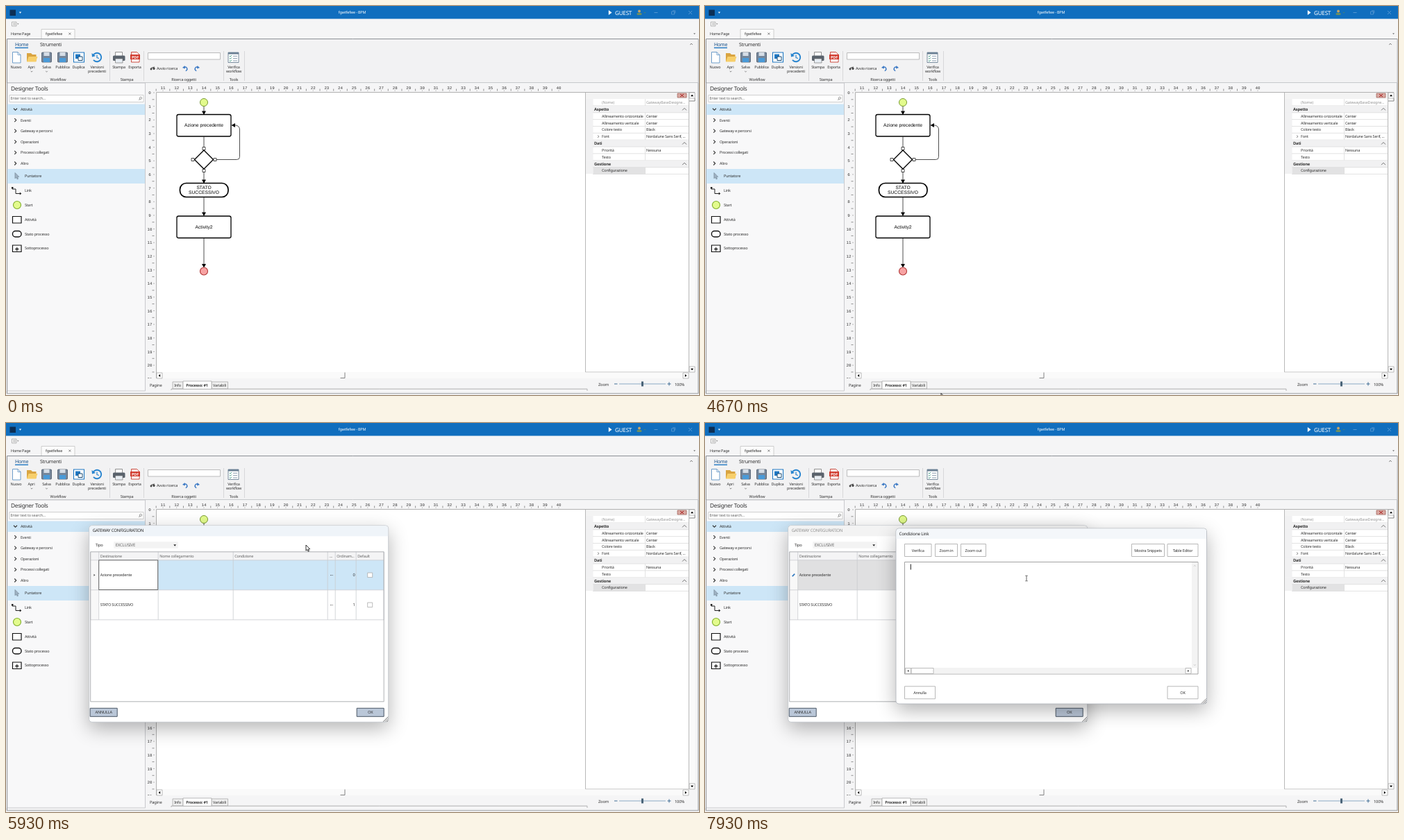
An HTML page with a canvas that plays this animation: 998 by 561 pixels, repeating every 8000 ms.

```html
<!DOCTYPE html>
<html lang="it">
<head>
<meta charset="utf-8">
<title>Workflow designer</title>
<style>
html, body { margin: 0; width: 100%; height: 100%; overflow: hidden; background: #f5f5f6; }
canvas { display: block; width: 998px; height: 561px; }
</style>
</head>
<body>
<canvas id="stage" width="998" height="561"></canvas>
<script>
const ctx = document.getElementById('stage').getContext('2d');
const LOOP = 8000, BLUE = '#106ebe', INK = '#333', PICK = '#cde6f7', PAPER = '#f5f5f6';
const UI = '"Noto Sans", sans-serif', ARIAL = '"Liberation Sans", sans-serif', MONO = '"Liberation Mono", monospace';

// ---------- helpers ----------
const prog = (t, a, b) => Math.min(1, Math.max(0, (t - a) / (b - a)));
const ease = p => p * p * (3 - 2 * p);
const mix = (a, b, p) => a + (b - a) * p;

function text(s, x, y, o = {}) {
  const size = o.size || 5.5, font = o.font || UI;
  ctx.font = `${o.italic ? 'italic ' : ''}${o.bold ? 'bold ' : ''}${size}px ${font}`;
  ctx.letterSpacing = font === UI ? `${-0.035 * size}px` : '0px';
  ctx.textRendering = 'geometricPrecision';
  ctx.textAlign = o.align || 'left';
  ctx.fillStyle = o.color || INK;
  ctx.fillText(s, x, y + size * 0.36);
}
const mid = (s, x, y, o) => text(s, x, y, { ...o, align: 'center' });

function paint(fill, stroke, w = 1) {
  if (fill) { ctx.fillStyle = fill; ctx.fill(); }
  if (stroke) { ctx.strokeStyle = stroke; ctx.lineWidth = w; ctx.stroke(); }
}
function box(x, y, x2, y2, fill, stroke, w, r = 0) {
  ctx.beginPath();
  ctx.roundRect(x, y, x2 - x, y2 - y, r);
  paint(fill, stroke, w);
}
function dot(x, y, r, fill, stroke, w) {
  ctx.beginPath();
  ctx.arc(x, y, r, 0, 7);
  paint(fill, stroke, w);
}
function trace(pts) {
  ctx.beginPath();
  for (let i = 0; i < pts.length; i += 2) ctx.lineTo(pts[i], pts[i + 1]);
}
function line(color, w, ...pts) { trace(pts); paint(null, color, w); }
function poly(fill, stroke, w, ...pts) { trace(pts); ctx.closePath(); paint(fill, stroke, w); }

// Shadow falls outside the panel only, so a fading panel stays clear.
function panel(x, y, x2, y2, r, edge, blur, dy, alpha) {
  ctx.save();
  ctx.beginPath();
  ctx.rect(-200, -200, 1400, 1000);
  ctx.roundRect(x, y, x2 - x, y2 - y, r);
  ctx.clip('evenodd');
  ctx.shadowColor = `rgba(0,0,0,${alpha})`;
  ctx.shadowBlur = blur;
  ctx.shadowOffsetY = dy;
  box(x, y, x2, y2, '#fff', null, 0, r);
  ctx.restore();
  box(x, y, x2, y2, '#fff', edge, 0.8, r);
}
function tri(x, y, r, dir, color = '#222') {
  ctx.save();
  ctx.translate(x, y);
  ctx.rotate(dir * Math.PI / 2);
  poly(color, null, 0, -r * 0.6, -r, r * 0.7, 0, -r * 0.6, r);
  ctx.restore();
}
function chevron(x, y, r, dir, color = '#444', w = 1) {
  ctx.save();
  ctx.translate(x, y);
  ctx.rotate(dir * Math.PI / 2);
  line(color, w, -r / 2, -r, r / 2, 0, -r / 2, r);
  ctx.restore();
}

// ---------- main window ----------
function titleBar(active) {
  box(0, 0, 998, 18.5, BLUE);
  box(5.5, 5.5, 14, 14, '#0c2f55');
  tri(20.5, 9.5, 1.7, 1, '#fff');
  mid('fgwtfefwe - BPM', 498.5, 9.5, { color: '#fff' });
  tri(870, 9.5, 3.6, 0, '#fff');
  text('GUEST', 877, 10, { size: 8.2, color: '#fff' });
  dot(912, 7.5, 1.9, '#c9a565');
  box(908.5, 10, 915.5, 13, '#6f8f5e', null, 0, 1.5);
  chevron(920, 9.5, 1.2, 1, '#5a8a5a', 0.8);
  const c = active ? '#fff' : '#5b9bd3';
  line(c, 0.9, 933.5, 9.5, 938.5, 9.5);
  box(958.5, 8, 962.5, 12, null, c, 0.8);
  line(c, 0.8, 960, 6.8, 963.8, 6.8, 963.8, 10.5);
  line(c, 0.9, 983, 7, 988, 12);
  line(c, 0.9, 988, 7, 983, 12);
}

function tabs(active) {
  box(8.5, 23, 15, 29, '#fff', '#999', 0.7);
  line('#888', 0.7, 10, 25, 14, 25);
  line('#888', 0.7, 10, 27, 14, 27);
  tri(17.3, 26, 1.2, 1, '#777');
  text('Home Page', 7, 40);
  box(51, 33.5, 99, 47.5, '#fbfbfb', '#c4c4c4', 0.8);
  text('fgwtfefwe', 57, 40, { color: active ? '#1768b0' : INK });
  line('#555', 0.7, 90.3, 38.5, 93.3, 41.5);
  line('#555', 0.7, 93.3, 38.5, 90.3, 41.5);
  tri(991.5, 40, 1.4, 1, '#666');
  line('#8d9196', 1, 1.5, 559, 1.5, 47.5, 997, 47.5, 997, 559);
}

function floppy(x) {
  box(x, 67, x + 14, 81, '#75869a', '#4c5a6b', 0.8, 1);
  box(x + 3, 67, x + 11, 72, '#d5dde6');
  box(x + 2.5, 75, x + 11.5, 81, '#4a9ad8');
}
function undo(x, flip) {
  ctx.save();
  ctx.translate(x, 90);
  ctx.scale(flip, 1);
  ctx.beginPath();
  ctx.arc(0, 0.8, 2.8, -2, 1.3);
  paint(null, '#3c79c4', 1.4);
  poly('#3c79c4', null, 0, -4, -1, -0.5, -4, 0, 0.6);
  ctx.restore();
}

function ribbonIcons() {
  poly('#fff', '#5f93c4', 0.9, 9.5, 66.5, 17, 66.5, 21, 70.5, 21, 82, 9.5, 82);
  line('#5f93c4', 0.8, 17, 66.5, 17, 70.5, 21, 70.5);
  poly('#d9a441', null, 0, 30, 68, 36, 68, 38, 70, 43.5, 70, 43.5, 80, 30, 80);
  poly('#f7cf6b', null, 0, 32.5, 73, 45.5, 73, 43, 80.5, 30, 80.5);
  floppy(51.5);
  floppy(74.5);
  box(97.5, 67, 112.5, 81, '#fff', '#1e77c2', 1.1);
  box(100, 69.5, 107, 76, '#1e77c2');
  box(104, 73, 110, 78.5, '#fff', '#14466f', 1);
  ctx.beginPath();
  ctx.arc(131, 74, 6.2, -2.6, 2.5);
  paint(null, '#2784cf', 1.9);
  poly('#2784cf', null, 0, 123.5, 68, 124, 73.5, 129, 72);
  line('#2784cf', 1.2, 131, 70.5, 131, 74.5, 134, 75.5);
  box(157.5, 66.5, 167.5, 73, '#fff', '#777', 0.8);
  box(154, 71.5, 171.5, 79, '#59626c', null, 0, 1.5);
  box(157.5, 76, 168, 82, '#e8eef4', '#777', 0.7);
  poly('#fff', '#c6392c', 0.9, 180.5, 66.5, 188.5, 66.5, 192, 70, 192, 81, 180.5, 81);
  box(179, 70, 193, 77, '#d13b2e');
  mid('PDF', 186, 73.6, { size: 5.5, bold: true, color: '#fff' });
  box(320, 67, 335, 81.5, '#fff', '#6a7f93', 0.9);
  box(320, 67, 335, 69.5, '#6a7f93');
  for (const y of [72.3, 75.6, 79]) {
    line('#2b8f78', 0.9, 321.8, y - 0.3, 323, y + 0.8, 325, y - 1.2);
    line('#7f93a6', 0.9, 327, y, 333, y);
  }
}

function ribbon() {
  box(2, 48, 996.5, 110.5, '#f2f2f3');
  text('Home', 13, 55.5, { size: 7.1, color: '#174f86' });
  line(BLUE, 1.3, 13, 60.3, 32, 60.3);
  text('Strumenti', 49, 55.5, { size: 7.1 });
  chevron(987, 55, 1.8, 3, '#555', 0.8);
  ribbonIcons();
  const labels = [['Nuovo', 14.5], ['Apri', 36.5], ['Salva', 58.5], ['Pubblica', 81.5], ['Duplica', 104.5],
    ['Versioni', 131], ['Stampa', 162.5], ['Esporta', 185.5], ['Verifica', 328]];
  for (const [s, x] of labels) mid(s, x, 88);
  mid('precedenti', 131, 94.5);
  mid('workflow', 328, 94.5);
  chevron(37, 94.5, 1.3, 1, '#555', 0.7);
  chevron(58.5, 94.5, 1.3, 1, '#555', 0.7);
  for (const x of [149.5, 198.5, 313.5, 343.5]) line('#d4d4d6', 0.9, x, 65, x, 108);
  mid('Workflow', 75, 106.5);
  mid('Stampa', 174, 106.5);
  mid('Ricerca oggetti', 256, 106.5);
  mid('Tools', 328, 106.5);
  box(204.5, 67.5, 308.5, 77, '#fff', '#b5b5b5', 0.9);
  dot(209, 91, 1.4, '#444');
  dot(213, 90.3, 1.6, '#444');
  line('#444', 1.3, 209, 89.5, 214, 88);
  text('Avvio ricerca', 217, 90);
  undo(258, 1);
  undo(275, -1);
  line('#c6c8cb', 1, 2, 110.5, 997, 110.5);
}

function toolbox() {
  box(2, 111, 200.5, 555, '#f8f8f9', '#c3c5c8', 0.9);
  text('Designer Tools', 7, 119, { size: 8.3 });
  box(5, 128.5, 198, 138.5, '#fff', '#c4c4c4', 0.8);
  text('Enter text to search...', 6.5, 133.5, { color: '#666' });
  dot(194, 132.8, 1.6, null, '#777', 0.7);
  line('#777', 0.8, 193, 134, 191.3, 136);
  box(2, 141.5, 200, 157, PICK);
  ['Attività', 'Eventi', 'Gateway e percorsi', 'Operazioni', 'Processi collegati', 'Altro'].forEach((s, i) => {
    const y = 149 + i * 15.6;
    chevron(13.5, y, 2.5, i ? 0 : 1, '#333', 1.1);
    text(s, 21, y);
  });
  box(2, 235, 200, 256, PICK);
  arrowPointer(13, 240.5, '#9fb3c4', '#7b8d9c');
  line('#222', 1, 9, 262, 9, 264, 14, 264, 14, 270.5, 20, 270.5);
  box(8, 261, 10.5, 263.5, '#222');
  tri(21, 270.5, 2, 0);
  dot(16, 287, 5.5, '#e3fb8d', '#7fae2c', 1.1);
  box(9.5, 303.5, 22, 313, '#fff', '#111', 1.2);
  box(9.5, 324.5, 22, 333, '#fff', '#111', 1.4, 4);
  box(9.5, 345, 22, 354.5, '#fff', '#111', 1.2);
  line('#111', 1.2, 13, 350.5, 18.5, 350.5);
  line('#111', 1.2, 15.8, 348, 15.8, 353.5);
  ['Puntatore', 'Link', 'Start', 'Attività', 'Stato processo', 'Sottoprocesso']
    .forEach((s, i) => text(s, 27, 245.5 + i * 20.8));
}

function rulers() {
  const step = 19.655;
  for (let n = 11; n <= 40; n++) {
    const x = 226 + (n - 11) * step;
    mid(n, x, 118, { font: MONO, size: 5.8 });
    line('#777', 0.8, x - step / 2, 119.5, x - step / 2, 122.5);
    line('#999', 0.7, x, 121.5, x, 123);
  }
  ctx.save();
  ctx.beginPath();
  ctx.rect(200, 120, 16, 417);
  ctx.clip();
  for (let n = 0; n <= 21; n++) {
    const y = 125 + n * step;
    mid(n, 207, y, { font: MONO, size: 5.8 });
    line('#777', 0.8, 210.5, y + step / 2, 213.5, y + step / 2);
    line('#999', 0.7, 212, y, 214, y);
  }
  ctx.restore();
}

function arrowDown(y1, y2) {
  line('#222', 0.8, 285, y1, 285, y2 - 3);
  poly('#000', null, 0, 282, y2 - 5.5, 288, y2 - 5.5, 285, y2);
}
function diagram() {
  box(216.5, 124.5, 984, 528.5, '#fff');
  line('#a9a9a9', 0.9, 216.5, 537, 216.5, 124.5, 992, 124.5);
  arrowDown(144, 157);
  dot(285, 139, 5.5, '#e3fb8d', '#7a9c35', 1);
  const label = { font: ARIAL, size: 6.7, color: '#000' };
  box(246, 156.5, 324, 188, '#fff', '#000', 1.3, 2.5);
  mid('Azione precedente', 285, 172, label);
  line('#222', 0.8, 285, 188, 285, 208);
  ctx.beginPath();
  ctx.moveTo(298, 221.5);
  ctx.arcTo(336.5, 221.5, 336.5, 200, 4);
  ctx.arcTo(336.5, 172, 328, 172, 6);
  ctx.lineTo(328, 172);
  paint(null, '#222', 0.8);
  poly('#000', null, 0, 330, 169, 330, 175, 324.5, 172);
  poly('#fff', '#000', 1.4, 285, 208, 298.5, 221.5, 285, 235, 271.5, 221.5);
  arrowDown(235, 256);
  for (const [x, y] of [[285, 205.5], [269, 221.5], [301, 221.5], [285, 237.5]])
    box(x - 2, y - 2, x + 2, y + 2, '#fff', '#222', 0.8);
  box(250.5, 255.5, 320, 275.5, '#fff', '#000', 1.7, 9);
  mid('STATO', 285, 261.3, label);
  mid('SUCCESSIVO', 285, 269, label);
  arrowDown(276, 303);
  box(246, 303, 324, 334.5, '#fff', '#000', 1.3, 2.5);
  mid('Activity2', 285, 319, label);
  arrowDown(335, 377.5);
  dot(285, 382.5, 5.5, '#f7a3a3', '#b03535', 1.1);
}

function properties() {
  box(834.5, 125, 983.5, 528, '#fff', '#b2b2b2', 0.9);
  box(835, 125, 983, 134, '#f3f3f3');
  box(967, 126, 980, 132, '#d9aaa3', '#a05a52', 0.7);
  line('#a22', 1, 971, 127, 976, 131);
  line('#a22', 1, 976, 127, 971, 131);
  box(835, 134, 845.5, 242, '#f1f1f2');
  const rows = [['(Nome)', 'GatewayBaseDesigne...'], ['Aspetto'], ['Allineamento orizzontale', 'Center'],
    ['Allineamento verticale', 'Center'], ['Colore testo', 'Black'], ['Font', 'Nordalune Sans Serif, ...'],
    ['Dati'], ['Priorità', 'Nessuna'], ['Testo', ''], ['Gestione'], ['Configurazione', '']];
  rows.forEach(([name, value], i) => {
    const y = 139 + i * 9.85, top = y - 4.9, end = y + 4.9;
    if (value === undefined) {
      box(835, top, 983, end, '#f1f1f2');
      text(name, 847, y, { size: 5.8, bold: true });
      chevron(977, y, 3, 3, '#555', 0.8);
    } else {
      const color = i ? INK : '#999';
      if (i === 10) box(845.5, top, 920.5, end, '#e2e2e3');
      text(name, 858, y, { color });
      text(value, 922, y, { color });
      line('#dcdcdc', 0.8, 920.5, top, 920.5, end);
    }
    line('#dcdcdc', 0.8, 845, end, 983, end);
  });
  chevron(853, 188.2, 1.7, 0, '#555', 0.8);
}

function footer() {
  box(984, 125, 992.5, 528, '#fafafa');
  box(217, 528.5, 983, 537, '#fafafa');
  const btn = (x, y, dir) => {
    box(x, y, x + 8, y + 8, '#fff', '#aaa', 0.8);
    tri(x + 4, y + 4, 2, dir, '#000');
  };
  btn(984, 125, 3); btn(984, 520, 1); btn(217, 529, 2); btn(975, 529, 0);
  line('#777', 0.9, 984, 137, 992, 137, 992, 133);
  line('#777', 0.9, 481.5, 536.5, 488, 536.5, 488, 528.5);
  text('Pagine', 207, 546.5, { size: 5.8 });
  line('#aaa', 0.9, 238, 554, 238, 552.3, 837, 552.3, 837, 555);
  box(240, 542, 255, 552, '#efefef', '#aaa', 0.8);
  box(296, 542, 319.5, 552, '#efefef', '#aaa', 0.8);
  box(255, 541, 296, 552.5, '#fff', '#aaa', 0.8);
  mid('Info', 247, 547);
  mid('Processo: #1', 275, 547, { bold: true });
  mid('Variabili', 307.5, 547);
  text('Zoom', 853, 546, { size: 5.8 });
  line('#3f6d94', 1, 876, 545, 880.5, 545);
  line('#8aa9c4', 1, 883, 545, 950, 545);
  box(915, 541.5, 918, 548.5, '#4a6478');
  line('#3f6d94', 1, 952.5, 545, 957.5, 545);
  line('#3f6d94', 1, 955, 542.5, 955, 547.5);
  text('100%', 963, 546, { size: 5.8 });
  line('#9a9da1', 1, 1, 558.8, 997, 558.8);
}

// ---------- overlays ----------
const MENU = [['Allineamento', 234], ['Colore', 245.5], ['Font', 257], ['Sposta oggetto alla pagina ...', 271.5],
  ['Taglia', 283], ['Copia', 294.5], ['Modifica testo', 309], ['Sposta testo', 320.5],
  ['Utenti e responsabili...', 335], ['Configurazione', 349.5], ['Elimina', 364]];

function menu(pointerY) {
  panel(287.5, 227.5, 415.5, 371, 0, '#868686', 4, 2, 0.45);
  box(288, 228, 415, 370.5, '#f8f8f8');
  box(288, 228, 301, 370.5, '#efeff0');
  for (const y of [264.5, 301.5, 327.5, 342, 356.8]) line('#cfcfcf', 0.9, 304, y, 414, y);
  for (const [s, y] of MENU) {
    if (Math.abs(pointerY - y) < 5.8) box(288.5, y - 5.6, 414.3, y + 5.6, '#bcdbf2', '#3f8ccc', 0.9);
    text(s, 306, y, { size: 5.9, bold: s === 'Configurazione', color: '#222' });
  }
  tri(408, 234, 1.9, 0);
  tri(408, 245.5, 1.9, 0);
  text('F2', 392, 309, { size: 5.8 });
  mid('A', 294.5, 257, { size: 7.5, bold: true, font: '"Liberation Serif", serif', color: '#2a5b9c' });
  line('#3d6fae', 1, 291.5, 280, 297, 286);
  line('#3d6fae', 1, 297, 280, 291.5, 286);
  box(291.5, 292.5, 296, 298, '#fff', '#6a93bd', 0.7);
  box(293, 291, 297.5, 296, '#fff', '#6a93bd', 0.7);
  box(291.5, 306, 296.5, 312, '#fff', '#888', 0.7);
  line('#e29a3b', 1.5, 294, 311, 298, 308);
  dot(294.5, 333, 1.8, '#c99a52');
  box(291.5, 335.5, 297.5, 338.5, '#7d9850', null, 0, 1);
  line('#788796', 1, 297, 346.5, 292, 349.5, 297, 352.5);
  line('#d33c30', 1.5, 292, 362, 296.5, 366.5);
  line('#d33c30', 1.5, 296.5, 362, 292, 366.5);
}

function grip(x, y) {
  for (const d of [2, 4.5, 7]) line('#555', 0.8, x - d, y, x, y - d);
}

function gatewayDialog(t) {
  const editing = t >= 6460, dim = t >= 6590, idle = t >= 6860;
  panel(119, 190.5, 550, 474, 4, '#b9bec5', 28, 9, 0.3);
  box(119.5, 191, 549.5, 206, dim ? '#f3f3f3' : '#eff4f9', null, 0, [4, 4, 0, 0]);
  text('GATEWAY CONFIGURATION', 124, 198, { size: 6.1, color: dim ? '#8f8f8f' : '#222' });
  text('Tipo', 128, 219, { size: 5.8 });
  box(154.5, 214, 247, 223.5, '#f3f3f3');
  text('EXCLUSIVE', 157, 219, { size: 6, color: '#666' });
  tri(242.5, 219, 1.9, 1);
  const cols = [121, 133, 218.5, 326.5, 462.5, 473.5, 503.5, 543.5];
  box(121, 228.5, 543.5, 240.5, '#f4f4f5');
  box(121, 240.5, 133, 326.5, '#f8f8f8');
  box(133, 240.5, 543.5, 283.5, idle ? '#e0e0e1' : PICK);
  if (editing) box(462.5, 240.5, 473.5, 283.5, '#c4c4c5');
  for (const x of cols) line('#c9ccd0', 0.8, x, 228.5, x, 326.5);
  for (const y of [240.5, 283.5, 326.5]) line('#c9ccd0', 0.8, 121, y, 543.5, y);
  box(121, 228.5, 543.5, 444.5, null, '#a6a9ad', 0.9);
  if (!editing) box(133, 240.5, 218, 283.2, '#fff', '#555', 0.9);
  const grey = { color: '#666' };
  ['Destinazione', 'Nome collegamento', 'Condizione', '....', 'Ordinam...', 'Default']
    .forEach((s, i) => text(s, cols[i + 1] + 2, 234.5, grey));
  [['Azione precedente', 262], ['STATO SUCCESSIVO', 305]].forEach(([s, y], i) => {
    text(s, 135, y, { size: 5.6 });
    text('...', 468, y - 1, { align: 'center', bold: true });
    text(i, 502, y, { size: 5.8, align: 'right' });
    box(520, y - 3.3, 527, y + 3.3, '#fff', '#aaa', 0.8);
  });
  if (editing) line('#2873bd', 1.5, 125, 263.8, 128.5, 260.3);
  else tri(126.7, 262, 1.6, 0, '#555');
  box(120.5, 454, 159.5, 466, '#bac7d8', '#4c5866', 1);
  box(504.5, 454, 543.5, 466, '#bac7d8', '#4c5866', 1);
  mid('ANNULLA', 140, 460, { size: 5.6 });
  mid('OK', 524, 460, { size: 5.6 });
  grip(549.5, 473.5);
}

function conditionDialog(t, p) {
  panel(275, 152, 722.5, 405, 4, '#aeb3ba', 28, 9, 0.3);
  box(275.5, 152.5, 722, 167, '#f4f7fa', null, 0, [4, 4, 0, 0]);
  text('Condizione Link', 279.5, 160, { size: 6.2, color: p < 0.5 ? '#999' : '#222' });
  if (p < 0.5) return;
  const buttons = [['Verifica', 287.5, 326, 174.5], ['Zoom in', 331.5, 363.5, 174.5], ['Zoom out', 368.5, 404.5, 174.5],
    ['Mostra Snippets', 614.5, 661.5, 174.5], ['Table Editor', 666, 710, 174.5],
    ['Annulla', 287.5, 331.5, 379.8], ['OK', 666, 710, 379.8]];
  for (const [s, x, x2, y] of buttons) {
    box(x, y, x2, y + 18, '#fff', '#b0b0b0', 0.9);
    mid(s, (x + x2) / 2, y + 9.3, { size: 5.6 });
  }
  box(287.5, 200.5, 710, 362, '#fff', '#999', 0.9);
  box(701, 201, 709.5, 353, '#f3f3f3');
  box(288, 353, 701, 361.5, '#f3f3f3');
  chevron(705.3, 206, 1.2, 3, '#aaa', 0.7);
  chevron(705.3, 349, 1.2, 1, '#aaa', 0.7);
  box(288.5, 353.5, 296.5, 361.5, '#fff', '#aaa', 0.8);
  box(692, 353.5, 700, 361.5, '#fff', '#aaa', 0.8);
  box(297, 353.5, 329, 361.5, '#fff', '#aaa', 0.8);
  tri(292.5, 357.5, 1.5, 2);
  tri(696, 357.5, 1.5, 0);
  grip(722, 404.5);
  const blink = Math.floor((t - 7260) / 267);
  if (t > 6900 && blink % 2 === 0) line('#000', 0.9, 296.3, 203.5, 296.3, 211.5);
}

// Draws content scaled around a centre while it fades in.
function popIn(p, from, cx, cy, dx, dy, draw) {
  if (p <= 0) return;
  const s = mix(from, 1, p);
  ctx.save();
  ctx.globalAlpha = p;
  ctx.translate(cx + dx * (1 - p), cy + dy * (1 - p));
  ctx.scale(s, s);
  ctx.translate(-cx, -cy);
  draw();
  ctx.restore();
}

function arrowPointer(x, y, fill = '#fff', stroke = '#000') {
  poly(fill, stroke, 0.8, x, y, x, y + 8.2, x + 1.9, y + 6.5, x + 3.2, y + 9.3,
    x + 4.5, y + 8.7, x + 3.3, y + 6, x + 5.7, y + 5.8);
}
function beam(x, y) {
  line('#222', 0.7, x, y - 3.6, x, y + 3.6);
  line('#222', 0.6, x - 1.8, y - 3.8, x + 1.8, y - 3.8);
  line('#222', 0.6, x - 1.8, y + 3.8, x + 1.8, y + 3.8);
}

// Pointer path: time, x, y
const PATH = [[800, 340, 563], [1270, 288, 227], [1930, 288, 227], [2460, 351, 345.5], [3480, 351, 345.5],
  [3790, 340, 563], [4600, 340, 563], [4667, 340, 558.5], [4920, 414, 200], [4980, 414, 200], [5340, 414.7, 157.3],
  [5700, 414.7, 157.3], [6320, 469, 216], [6860, 469, 216], [7200, 464, 223], [7780, 464, 223], [7920, 463, 224]];
function pointerAt(t) {
  const i = PATH.findIndex(k => k[0] > t);
  if (i === 0) return PATH[0].slice(1);
  if (i < 0) return PATH[PATH.length - 1].slice(1);
  const [a, x, y] = PATH[i - 1], [b, x2, y2] = PATH[i], p = ease(prog(t, a, b));
  return [mix(x, x2, p), mix(y, y2, p)];
}

function render(t) {
  const active = t >= 1730 && t < 3530, [px, py] = pointerAt(t);
  box(0, 0, 998, 561, PAPER);
  titleBar(active);
  tabs(active);
  ribbon();
  toolbox();
  rulers();
  diagram();
  properties();
  footer();
  if (t >= 1790 && t < 3195) menu(py + 4);

  const drag = ease(prog(t, 4980, 5340));
  ctx.save();
  ctx.translate(0.7 * drag, -42.7 * drag);
  popIn(prog(t, 4700, 4860), 0.9, 334.5, 332, 0, 0, () => gatewayDialog(t));
  ctx.restore();

  const snap = ease(prog(t, 5130, 5330)) - ease(prog(t, 5580, 5780));
  if (snap > 0) panel(267, -14, 731, mix(-6, 5.5, snap), 4, null, 6, 2, 0.3);

  const open = prog(t, 6680, 6890);
  popIn(open, 0.845, 498.7, 278.5, -5, -2.5, () => conditionDialog(t, open));

  if (t >= 6920) beam(px, py);
  else arrowPointer(px, py);
}

let shown = -1;
function tick(now) {
  const step = Math.floor(((now % LOOP) + 4) * 0.015);
  if (step !== shown) {
    shown = step;
    render(step / 0.015 % LOOP);
  }
  requestAnimationFrame(tick);
}
render(0);
requestAnimationFrame(tick);
</script>
</body>
</html>
```
